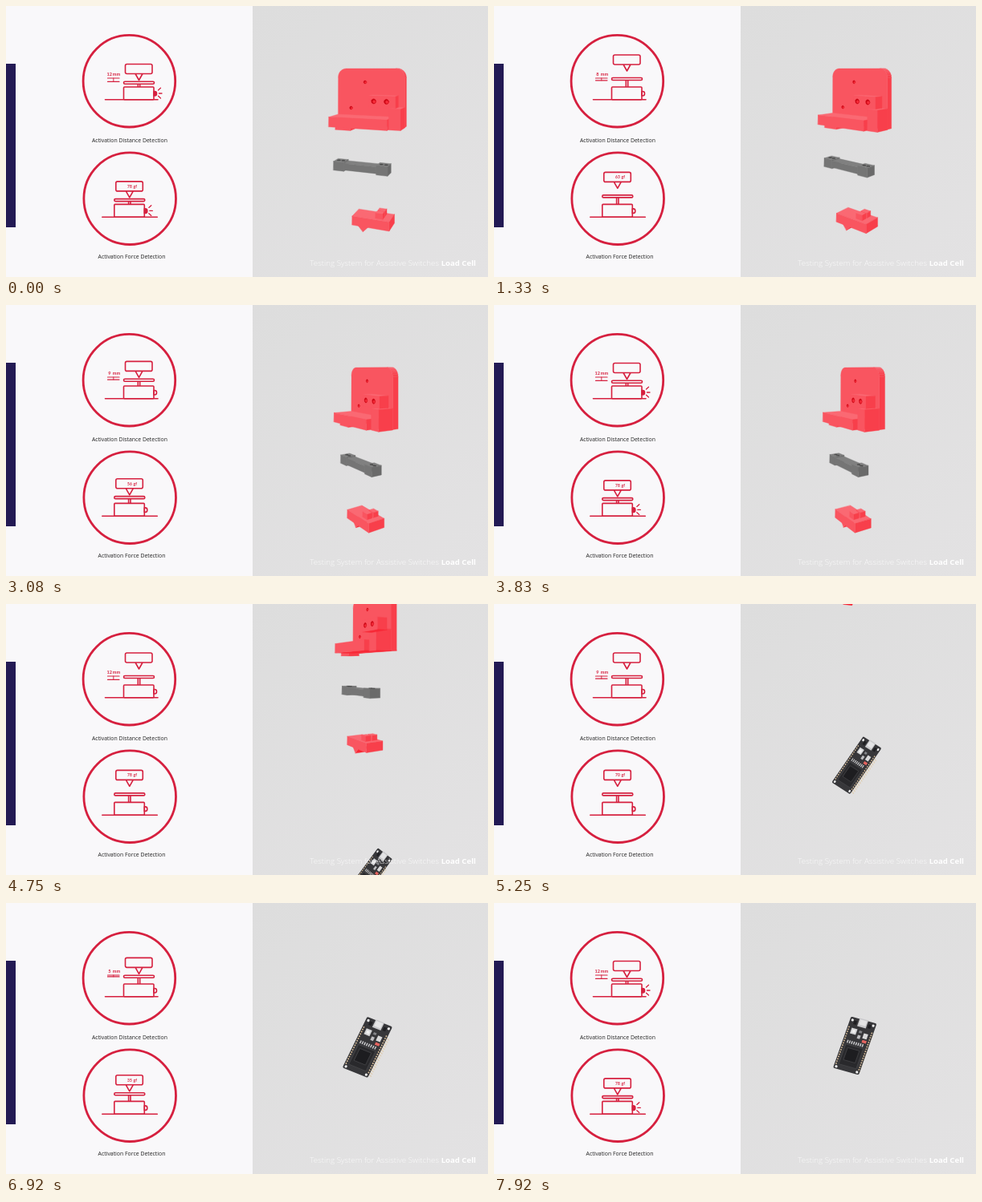
These frames come from a looping animation (600 by 338 pixels, 8000 ms). An HTML page with a canvas:

```html
<!DOCTYPE html>
<html lang="en">
<head>
<meta charset="utf-8">
<title>Load Cell</title>
<style>
  html, body { margin: 0; width: 100%; height: 100%; overflow: hidden; }
  canvas { display: block; width: 600px; height: 338px; }
</style>
</head>
<body>
<canvas id="stage"></canvas>
<script>
const LOOP = 8000, PRESS_CYCLE = 4000;
const RED = '#d6203f';
const canvas = document.getElementById('stage');
const ctx = canvas.getContext('2d');
const dpr = window.devicePixelRatio || 1;
canvas.width = 600 * dpr;
canvas.height = 338 * dpr;

const clamp = x => Math.min(1, Math.max(0, x));
const lerp = (a, b, k) => a + (b - a) * k;
const span = (t, from, to) => clamp((t - from) / (to - from));
const smooth = k => (1 - Math.cos(Math.PI * k)) / 2;

function rect(x, y, w, h, color) {
  ctx.fillStyle = color;
  ctx.fillRect(x, y, w, h);
}

function line(x1, y1, x2, y2) {
  ctx.beginPath();
  ctx.moveTo(x1, y1);
  ctx.lineTo(x2, y2);
  ctx.stroke();
}

function dot(x, y, r, color) {
  ctx.beginPath();
  ctx.arc(x, y, r, 0, 2 * Math.PI);
  ctx.fillStyle = color;
  ctx.fill();
}

function text(str, x, y, font, color, align = 'center') {
  ctx.font = font;
  ctx.fillStyle = color;
  ctx.textAlign = align;
  ctx.fillText(str, x, y);
}

function polygon(points, color) {
  ctx.beginPath();
  points.forEach(([x, y]) => ctx.lineTo(x, y));
  ctx.closePath();
  ctx.fillStyle = ctx.strokeStyle = color;
  ctx.lineWidth = 0.4;
  ctx.fill();
  ctx.stroke();
}

// ---------- left panel ----------

function pressState(t) {
  const p = t % PRESS_CYCLE;
  const push = smooth(span(p, 2500, 3400));
  let y = 72.5;
  if (p < 1400) y = lerp(72.5, 61, smooth(span(p, 250, 650)));
  else if (p < 2300) y = lerp(61, 65, smooth(span(p, 1400, 2050)));
  else y = lerp(65, 72.5, push);
  const reading = from => p < 2300 ? 1 - span(p, from, 2050) : push;
  return { y, depth: clamp((y - 67.5) / 5), mm: 12 * reading(950), gf: 78 * reading(1160) };
}

function pressIcon({ y, depth }, groundFrom, groundTo) {
  ctx.strokeStyle = ctx.fillStyle = RED;
  ctx.lineWidth = 1.6;
  ctx.lineJoin = ctx.lineCap = 'round';

  ctx.beginPath();
  ctx.roundRect(148.5, y, 33.5, 12, 2);
  ctx.moveTo(161, y + 12);
  ctx.lineTo(165.5, y + 20);
  ctx.lineTo(170, y + 12);
  ctx.stroke();

  const plate = 91 + 4.7 * depth;
  ctx.beginPath();
  ctx.roundRect(146.5, plate - 1.5, 38, 3, 1.5);
  ctx.rect(164.3, plate + 1.5, 2.4, 101 - plate - 1.5);
  ctx.roundRect(146.5, 101, 37.5, 15.8, 1);
  ctx.stroke();
  line(groundFrom, 116.8, groundTo, 116.8);

  ctx.beginPath();
  ctx.roundRect(184, 106.5, 3.5, 5.5, [0, 2.5, 2.5, 0]);
  ctx.stroke();
  if (depth > 0.97) {
    ctx.fill();
    ctx.lineWidth = 1.3;
    line(189.5, 105, 192.5, 102.3);
    line(190.5, 109, 194, 109);
    line(189.5, 112.3, 192.5, 115);
  }
}

function circle(x, y) {
  ctx.beginPath();
  ctx.arc(x, y, 57.3, 0, 2 * Math.PI);
  ctx.strokeStyle = RED;
  ctx.lineWidth = 2.8;
  ctx.stroke();
}

function leftPanel(t) {
  rect(0, 0, 307, 338, '#f9f8fa');
  rect(0, 72, 12, 204, '#231a54');
  const state = pressState(t);
  const caption = '6.9px "Open Sans", sans-serif';
  const figures = 'bold 5.6px Lato, sans-serif';
  const smallFigures = 'bold 4.9px Lato, sans-serif';

  circle(153.4, 93.7);
  pressIcon(state, 123.5, 189);
  text(Math.round(state.mm), 128.8, 87, figures, RED);
  text('mm', 132.8, 87, figures, RED, 'left');
  const gap = 4.3 * state.mm / 12;
  ctx.lineWidth = 1.2;
  line(126.5, 90, 141, 90);
  if (gap > 0.3) {
    line(126.5, 90 + gap, 141, 90 + gap);
    ctx.lineWidth = 0.9;
    line(133.8, 90, 133.8, 90 + gap);
  }
  text('Activation Distance Detection', 154, 169.8, caption, '#222');

  circle(154.2, 240.2);
  ctx.save();
  ctx.translate(-11.7, 146.4);
  pressIcon(state, 131.5, 200);
  text(Math.round(state.gf), 165.6, state.y + 7.8, smallFigures, RED);
  text('gf', 170.3, state.y + 7.8, smallFigures, RED, 'left');
  ctx.restore();
  text('Activation Force Detection', 156.5, 314.5, caption, '#222');
}

// ---------- exploded load cell ----------

const EYE = 80, DISTANCE = 420, AXIS = 453.5;
const RED_PART = { hue: 356, sat: 93, light: 65.5 };
const GREY_PART = { hue: 0, sat: 0, light: 46 };

const box = (u0, u1, v0, v1) => [[u0, v0], [u1, v0], [u1, v1], [u0, v1]];

function arc(cu, cv, r, from, to, steps = 6) {
  return Array.from({ length: steps + 1 }, (_, i) => {
    const a = lerp(from, to, i / steps);
    return [cu + r * Math.cos(a), cv + r * Math.sin(a)];
  });
}

const backPlate = [
  ...arc(-33, 9, 11, Math.PI, 1.5 * Math.PI),
  ...arc(33, 9, 11, 1.5 * Math.PI, 2 * Math.PI),
  [44, 69], [-44, 69]
];

function loadCell(angle, shift) {
  const cos = Math.cos(angle), sin = Math.sin(angle);
  const project = (u, v, w) => {
    const scale = DISTANCE / (DISTANCE - u * sin - w * cos);
    return [AXIS + scale * (u * cos - w * sin), EYE + scale * (v - shift)];
  };
  const area = pts => pts.reduce((sum, [x, y], i) => {
    const [nx, ny] = pts[(i + 1) % pts.length];
    return sum + x * ny - nx * y;
  }, 0);
  const paint = (m, light) => `hsl(${m.hue} ${m.sat}% ${light}%)`;

  // Extrudes a clockwise outline from depth w0 forward to w1.
  const prism = (outline, w0, w1, m) => {
    outline.forEach(([u, v], i) => {
      const [u2, v2] = outline[(i + 1) % outline.length];
      const face = [project(u, v, w1), project(u2, v2, w1), project(u2, v2, w0), project(u, v, w0)];
      if (area(face) >= 0) return;
      const len = Math.hypot(u2 - u, v2 - v);
      const up = (u2 - u) / len, side = Math.abs(v2 - v) / len;
      polygon(face, paint(m, m.light + up * (up > 0 ? 4 : 9) - 4.5 * side));
    });
    polygon(outline.map(([u, v]) => project(u, v, w1)), paint(m, m.light));
  };
  const frontHole = (u, v, w, r, m) => {
    polygon(arc(u, v, r, 0, 2 * Math.PI, 12).map(([a, b]) => project(a, b, w)), paint(m, m.light - 24));
    polygon(arc(u + 0.6, v + 0.4, r * 0.55, 0, 2 * Math.PI, 10).map(([a, b]) => project(a, b, w)), paint(m, m.light - 8));
  };
  const topHole = (u, v, w, r, m) =>
    polygon(arc(u, w, r, 0, 2 * Math.PI, 12).map(([a, b]) => project(a, v, b)), paint(m, m.light - 18));

  // sensor tip
  prism([[-10, 185], [6, 185], [-2, 193]], 8, 20, RED_PART);
  prism(box(-14, 32, 174, 184.5), 3, 25, RED_PART);
  for (const w of [5, 14]) prism(box(14, 23, 168, 174), w, w + 7, RED_PART);

  // metal beam
  prism(box(-42, -28, 113, 124), 4, 18, GREY_PART);
  prism(box(-28, 14, 114.5, 122.5), 4, 18, GREY_PART);
  prism(box(14, 28, 113, 124), 4, 18, GREY_PART);
  if (shift < 100) for (const u of [-38, -32, 18, 24]) topHole(u, 113, 11, 2, GREY_PART);

  // bracket
  prism(backPlate, -8, 0, RED_PART);
  frontHole(-7, 15, 0, 2, RED_PART);
  frontHole(-26, 48, 0, 2, RED_PART);
  prism(box(-38, -18, 69, 73), 6, 21, RED_PART);
  prism(box(-44, 30, 57, 69), 0, 27, RED_PART);
  prism(box(30, 44, 45, 69.5), 0, 20, RED_PART);
  prism(box(3, 36, 31, 45), 0, 13, RED_PART);
  frontHole(9, 37.5, 13, 3, RED_PART);
  frontHole(25, 37.5, 13, 3, RED_PART);
}

// ---------- controller board ----------

// corner x, corner y, short side dx dy, long side dx dy, pin length
const boardPoses = [
  [4750, [463, 141, 18, 14, -40, 54, 4]],
  [6080, [454, 142, 31, 16, -38, 63, 7]],
  [7920, [444.5, 141.5, 32, 9, -22.5, 64, 1]]
];

function boardPose(t) {
  const [a, b, c] = boardPoses;
  const [from, to] = t < b[0] ? [a, b] : [b, c];
  const k = span(t, from[0], to[0]);
  return from[1].map((v, i) => lerp(v, to[1][i], k));
}

function board(t, offset) {
  const [x, y, sx, sy, lx, ly, pin] = boardPose(t);
  ctx.save();
  ctx.transform(sx / 36, sy / 36, lx / 72, ly / 72, x, y + offset);

  ctx.strokeStyle = '#e0cfb4';
  ctx.lineWidth = 1.3;
  for (let v = 16; v < 68; v += 3.2) line(35, v, 35 + pin, v + pin * 0.35);

  ctx.beginPath();
  ctx.roundRect(0, 0, 36, 72, 2);
  ctx.fillStyle = '#37373a';
  ctx.fill();
  for (let v = 14; v < 68; v += 3.2) {
    dot(2, v, 0.95, '#e6c9a2');
    dot(34, v, 0.95, '#e6c9a2');
  }
  for (const u of [3.5, 32.5]) for (const v of [4, 69]) dot(u, v, 1.7, '#eeeeee');

  // connector and parts
  rect(12, -1, 12, 11, '#c9c9cb');
  rect(13.5, 0.5, 9, 7, '#e4e4e5');
  rect(6, 4, 4, 5, '#1f1f22');
  rect(26, 4, 4, 5, '#1f1f22');
  rect(6, 14, 8, 8, '#d3d4d6');
  rect(8, 16, 4, 4, '#f0f0f0');
  rect(24, 17, 6, 7, '#d9d9da');
  rect(17, 15, 4, 3, '#85868a');
  rect(17, 21, 4, 5, '#bdbdc0');
  rect(25, 26, 6, 3.5, '#e5645f');
  for (let u = 6; u < 29; u += 3) rect(u, 31, 1.5, 4, '#cfcfd1');

  // radio module
  rect(6, 37, 24, 28, '#29292c');
  ctx.strokeStyle = '#48484b';
  ctx.lineWidth = 0.7;
  ctx.strokeRect(6, 37, 24, 28);
  rect(10, 41, 16, 17, '#1d1d20');
  ctx.strokeRect(10, 41, 16, 17);
  ctx.restore();
}

function rightPanel(t) {
  const back = ctx.createLinearGradient(307, 0, 600, 338);
  back.addColorStop(0, '#dddddd');
  back.addColorStop(1, '#e3e2e3');
  rect(307, 0, 293, 338, back);

  const scroll = smooth(span(t, 4250, 5500));
  const turn = 1 - (1 - clamp(t / 4400)) ** 2;
  if (scroll < 1) loadCell((20 + 38 * turn) * Math.PI / 180, 250 * scroll + 60 * scroll ** 3);
  if (scroll > 0) board(t, 250 * (1 - scroll));

  const bold = 'bold 9.6px "Open Sans", sans-serif';
  text('Load Cell', 585, 324, bold, '#fff', 'right');
  const start = 585 - ctx.measureText('Load Cell').width;
  text('Testing System for Assistive Switches', start - 2.7, 324, '300 9.8px "Open Sans", sans-serif', '#fafafa', 'right');
}

function draw(now) {
  const t = now % LOOP;
  ctx.setTransform(dpr, 0, 0, dpr, 0, 0);
  rightPanel(t);
  leftPanel(t);
  requestAnimationFrame(draw);
}
draw(performance.now());
</script>
</body>
</html>
```
